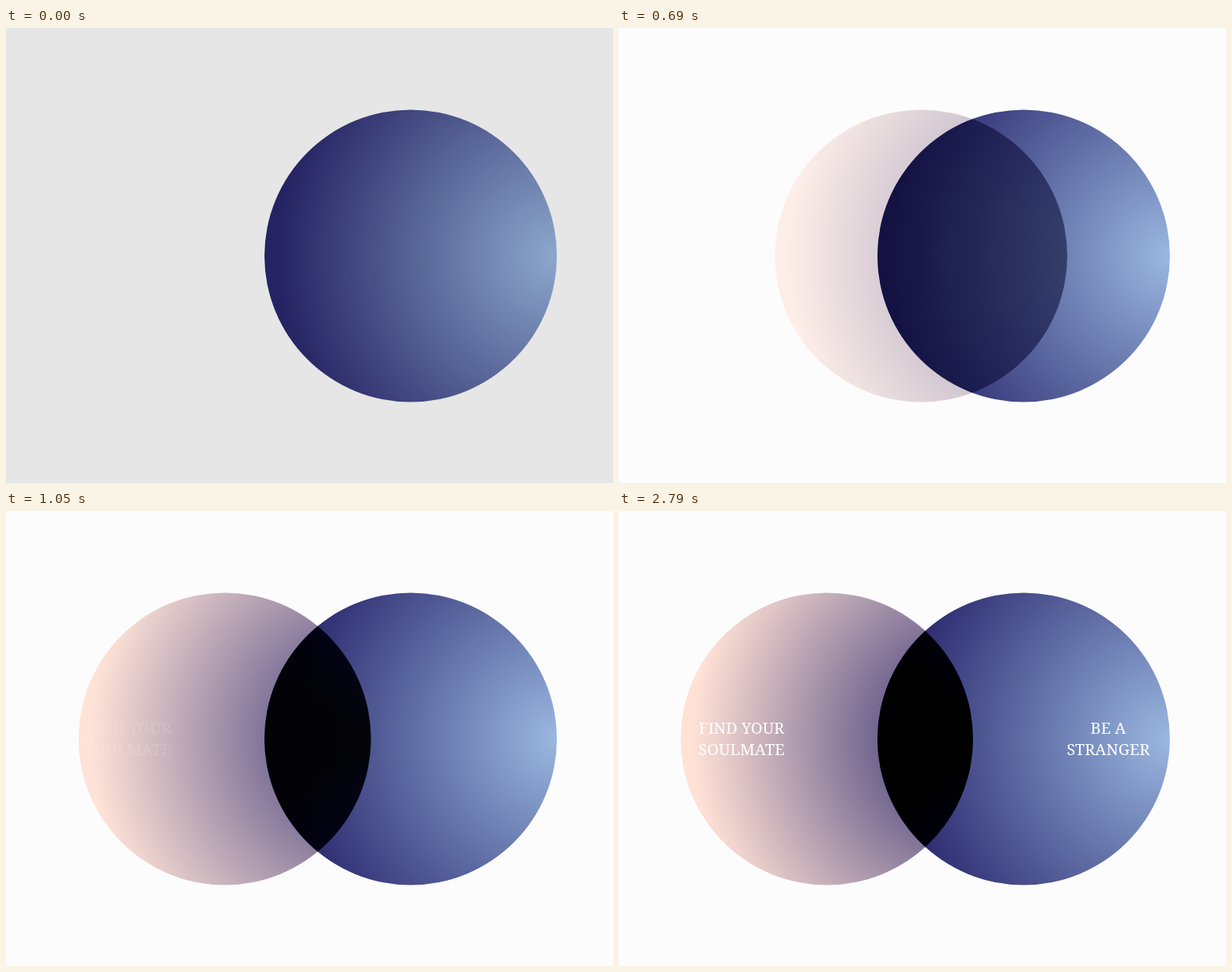
An HTML page with a canvas for the animation above (5610 ms loop, 768 px wide and 576 px high).

```html
<!DOCTYPE html>
<html lang="en">
<head>
<meta charset="utf-8">
<title>Two circles</title>
<style>
  html, body { margin: 0; width: 100%; height: 100%; overflow: hidden; background: #fcfcfc; }
  canvas { display: block; }
  p {
    position: absolute; top: 261px; width: 160px; margin: 0; opacity: 0;
    color: #fff; text-align: center; white-space: nowrap;
    font: 300 extra-condensed 20px/27px "Noto Serif", "Liberation Serif", serif;
  }
  #left { left: 75px; }
  #right { left: 539px; }
</style>
</head>
<body>
<canvas id="stage" width="768" height="576"></canvas>
<p id="left">FIND YOUR<br>SOULMATE</p>
<p id="right">BE A<br>STRANGER</p>
<script>
const W = 768, H = 576, R = 185, CY = 288.5, BLUE_X = 512;
const LOOP = 5610, STEP = 30;
const NAVY = [41, 38, 108], SKY = [154, 184, 224], PEACH = [255, 225, 213];

const ctx = stage.getContext('2d');
const lens = new OffscreenCanvas(W, H).getContext('2d');

const clamp = v => Math.min(1, Math.max(0, v));
const ramp = (t, from, to) => clamp((t - from) / (to - from));
const ease = u => u * u * (3 - 2 * u);
const rgb = c => `rgb(${c})`;
const invert = c => c.map(v => 255 - v);

function disc(x) {
  const path = new Path2D();
  path.arc(x, CY, R, 0, 2 * Math.PI);
  return path;
}

// Radial gradient centred on the right rim of a disc
function shade(c, x, inner, outer) {
  const g = c.createRadialGradient(x + R, CY, 0, x + R, CY, 355);
  g.addColorStop(0, rgb(inner));
  g.addColorStop(1, rgb(outer));
  return g;
}

function cover(c, style, mode) {
  c.globalCompositeOperation = mode;
  c.fillStyle = style;
  c.fillRect(0, 0, W, H);
}

// Linear burn of the two gradients: a + b - 1
function burn(x) {
  cover(lens, shade(lens, BLUE_X, invert(SKY), invert(NAVY)), 'copy');
  cover(lens, shade(lens, x, invert(NAVY), invert(PEACH)), 'lighter');
  cover(lens, '#fff', 'difference');
}

function draw(t) {
  const p = ease(ramp(t, 150, 1200));
  const x = BLUE_X - 249 * p;
  const blue = disc(BLUE_X), peach = disc(x);

  cover(ctx, '#fcfcfc', 'source-over');
  ctx.globalAlpha = p;
  ctx.fillStyle = shade(ctx, x, NAVY, PEACH);
  ctx.fill(peach);
  ctx.globalAlpha = 1;
  ctx.fillStyle = shade(ctx, BLUE_X, SKY, NAVY);
  ctx.fill(blue);

  burn(x);
  ctx.save();
  ctx.clip(blue);
  ctx.clip(peach);
  ctx.globalAlpha = p;
  ctx.drawImage(lens.canvas, 0, 0);
  ctx.restore();

  cover(ctx, `rgba(0,0,0,${0.087 * (1 - ramp(t, 0, 300))})`, 'source-over');

  left.style.opacity = ramp(t, 780, 2790);
  right.style.opacity = ramp(t, 1080, 2790);
}

const left = document.getElementById('left'), right = document.getElementById('right');
const start = performance.now();
function frame() {
  const t = (performance.now() - start) % LOOP;
  draw(Math.floor(t / STEP) * STEP);
  requestAnimationFrame(frame);
}
frame();
</script>
</body>
</html>
```
